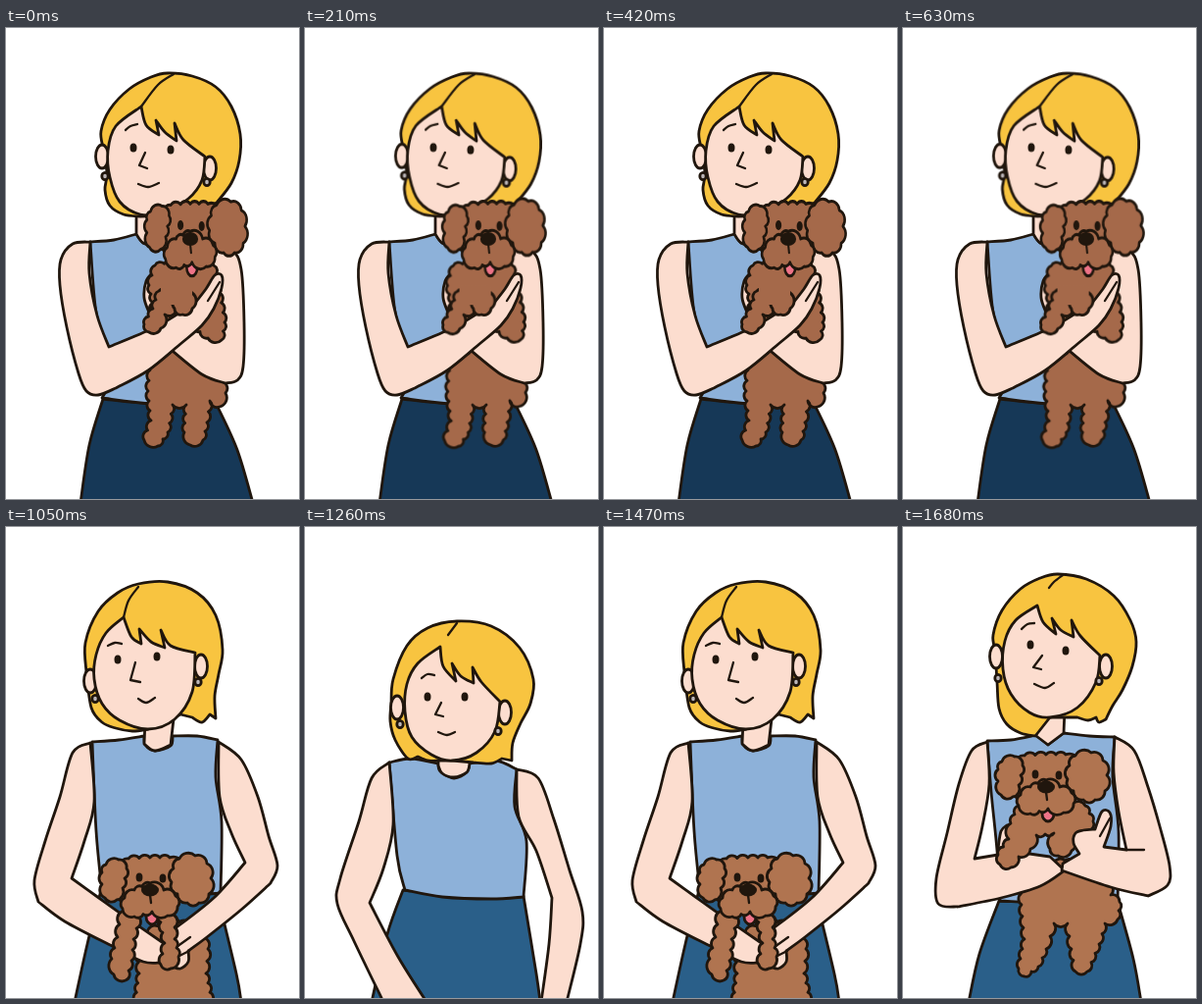
Write an HTML page that moves like this. It is 299 px wide and 480 px high and loops after 1890 ms.

```html
<!DOCTYPE html>
<html lang="en">
<head>
<meta charset="utf-8">
<title>Woman hugging a poodle</title>
<style>
  html, body { margin: 0; width: 100%; height: 100%; overflow: hidden; background: #fff; }
  svg { display: block; width: 100vw; height: 100vh; }
  path, ellipse { stroke: #20160d; stroke-width: 2.8; stroke-linejoin: round; stroke-linecap: round; }
  .ink { fill: #20160d; stroke: none; }
  .thin { stroke-width: 2.3; }

  .pose { visibility: hidden; animation: 1890ms step-end infinite; }
  #hug { animation-name: hug; }
  #hold { animation-name: hold; }
  #low { animation-name: low; }
  #alone { animation-name: alone; }
  @keyframes hug { 0% { visibility: visible } 44.444%, 100% { visibility: hidden } }
  @keyframes hold {
    0%, 55.555% { visibility: hidden }
    44.444%, 88.888%, 100% { visibility: visible }
  }
  @keyframes low {
    0%, 66.666%, 88.888%, 100% { visibility: hidden }
    55.555%, 77.777% { visibility: visible }
  }
  @keyframes alone { 0%, 77.777%, 100% { visibility: hidden } 66.666% { visibility: visible } }

  .sway { animation: sway 420ms step-end infinite; }
  .head { transform-origin: 150px 200px; --tilt: .7deg; }
  .pup { transform-origin: 185px 300px; --tilt: -.7deg; }
  @keyframes sway { 50% { transform: rotate(var(--tilt)) } }
</style>
</head>
<body>
<svg id="stage" viewBox="0 0 299 480" preserveAspectRatio="none"></svg>
<script>
const SKIN = '#fcddcf', HAIR = '#f8c440', TOP = '#8db1d9', SKIRT = '#2a5f89', NIGHT = '#163857';
const FUR = '#b07450', DARKFUR = '#a5694a', PINK = '#ee7388';

const points = text => (text.match(/-?[\d.]+ -?[\d.]+/g) || []).map(p => p.split(' ').map(Number));

// Smooth line through the points; "/" makes the point before it a corner.
function curve(text) {
  let last, d = '';
  for (const part of text.split('/')) {
    const run = points(part);
    if (!run.length) continue;
    if (last) run.unshift(last); else d = 'M' + run[0];
    for (let i = 0; i < run.length - 1; i++) {
      const b = run[i], c = run[i + 1], a = run[i - 1] || b, e = run[i + 2] || c;
      const mix = (p, q, r) => [p[0] + (q[0] - r[0]) / 6, p[1] + (q[1] - r[1]) / 6];
      d += 'C' + [mix(b, c, a), mix(c, b, e), c];
    }
    last = run[run.length - 1];
  }
  return d;
}

// Closed clockwise outline made of small round bumps.
function fur(text, fill) {
  const pts = points(text);
  let d = 'M' + pts[0];
  pts.forEach(([x, y], i) => {
    const [u, v] = pts[(i + 1) % pts.length];
    const len = Math.hypot(u - x, v - y), n = Math.max(1, Math.round(len / 11)), r = len / n * .62;
    for (let k = 1; k <= n; k++) d += `A${r} ${r} 0 0 1 ${x + (u - x) * k / n} ${y + (v - y) * k / n}`;
  });
  return `<path d="${d}Z" fill="${fill}"/>`;
}

const shape = (fill, text) => `<path d="${curve(text)}Z" fill="${fill}"/>`;
const line = text => `<path class="thin" d="${curve(text)}" fill="none"/>`;
const oval = (x, y, rx, ry, attrs) => `<ellipse cx="${x}" cy="${y}" rx="${rx}" ry="${ry}" ${attrs}/>`;
const dots = (text, rx, ry, attrs) => points(text).map(([x, y]) => oval(x, y, rx, ry, attrs)).join('');

const head = o =>
  shape(HAIR, o.hair) +
  dots(o.ears, 6.5, 12, `fill="${SKIN}"`) +
  shape(SKIN, o.face) +
  dots(o.rings, 3.2, 3.6, 'fill="#bcb6b8"') +
  dots(o.eyes, 3.5, 4.6, 'class="ink"') +
  [o.part, o.brow, o.nose, o.mouth].map(line).join('');

const dogHead = (x, y, fill, scale = '1 1') => `<g transform="translate(${x} ${y}) scale(${scale})">` +
  fur('-38 -18 -22 -32 0 -33 20 -33 34 -25 30 10 -28 12', fill) +
  fur('-45 -26 -32 -31 -24 -22 -28 -2 -34 10 -46 8 -49 -6 -49 -18', fill) +
  fur('24 -22 30 -32 46 -35 58 -27 62 -12 60 4 50 13 38 13 28 4 22 -8', fill) +
  oval(2, 27, 6, 8, `fill="${PINK}"`) +
  fur('-16 0 0 -7 14 0 26 6 28 17 18 26 2 22 -16 27 -28 19 -26 8', fill) +
  dots('-11 -13 13 -12', 3.4, 4.6, 'class="ink"') +
  oval(0, 0, 9, 6.5, 'class="ink"') + line('0 5 1 13') + '</g>';

const poses = {
  hug: [
    shape(NIGHT, '99 378 85 425 76 484 / 252 484 / 236 430 215 384 / 150 383 99 378'),
    shape(TOP, '86 218 110 216 133 210 / 140 219 152 222 / 205 225 / 214 384 / 150 383 98 377 / 104 365 106 340 / 92 290 86 218'),
    shape(SKIN, '133 183 / 133 210 / 140 219 154 222 / 175 222 / 175 183'),
    '<g class="sway head">',
    head({
      hair: '99 122 97 105 106 83 126 62 148 50 165 46 190 49 214 60 230 80 239 108 238 135 230 158 215 178 / 190 190 / 137 192 / 120 190 106 181 101 165 103 148 99 122',
      face: '138 80 / 143 99 156 109 / 153 94 / 162 106 174 115 / 172 97 / 181 114 203 131 / 200 155 186 174 160 188 137 190 116 177 106 152 104 125 112 100 138 80',
      ears: '98 131 208 143', rings: '101 151 205 157', eyes: '130 122 168 124',
      part: '171 47 155 58 138 80', brow: '122 104 127 100 134 98',
      nose: '142 127 / 136 140 / 144 143', mouth: '135 159 145 162 156 158'
    }),
    '</g><g class="sway pup">',
    fur('148 338 185 325 220 350 224 372 218 386 208 380 205 402 201 420 188 425 182 412 184 384 170 384 165 412 155 426 141 420 148 400 145 370', DARKFUR),
    '</g>',
    shape(SKIN, '205 222 / 230 226 240 246 243 300 242 345 236 359 224 362 / 200 353 165 325 / 190 300 / 205 270'),
    shape(SKIN, '150 249 143 258 141 275 146 290 / 160 285 / 160 252'),
    '<g class="sway pup">',
    fur('152 242 190 235 212 242 218 270 223 300 220 318 206 316 190 303 172 295 160 306 148 306 150 280 146 262', DARKFUR),
    '</g>',
    shape(SKIN, '86 218 68 220 56 236 55 262 62 305 74 352 82 370 94 374 112 367 / 145 349 178 322 200 303 212 286 220 265 220 252 213 252 204 266 190 284 / 176 291 / 150 306 105 325 / 93 293 85 250 86 218'),
    line('218 259 206 278'),
    '<g class="sway pup">',
    fur('156 268 172 270 174 288 162 292 158 306 146 310 141 302 150 286', DARKFUR),
    fur('176 270 190 270 190 286 180 292 172 286', DARKFUR),
    `<path d="M158 262H190V282H158Z" fill="${DARKFUR}" style="stroke:none"/>`,
    dogHead(188, 215, DARKFUR, '.9 1.08'),
    '</g>'
  ],

  hold: [
    shape(SKIRT, '98 381 78 435 67 484 / 243 484 / 235 440 219 382'),
    shape(TOP, '86 218 110 217 136 212 / 148 222 / 164 210 / 190 213 216 214 / 214 255 220 310 219 383 / 160 384 99 381 / 96 330 90 270 86 218'),
    shape(SKIN, '135 186 / 136 213 / 148 222 / 164 210 / 165 186'),
    head({
      hair: '94 125 92 110 101 85 120 63 140 52 158 48 187 53 215 70 232 95 238 117 234 142 224 166 214 182 207 196 / 200 199 197 194 / 189 197 178 194 / 150 194 / 135 213 / 120 210 106 201 98 185 96 158 94 125',
      face: '137 80 / 143 97 156 109 / 152 93 / 161 105 174 112 / 172 95 / 181 111 201 131 / 197 158 178 184 150 194 129 189 110 170 102 145 104 116 115 95 137 80',
      ears: '95 132 207 142', rings: '97 154 200 157', eyes: '130 120 166 126',
      part: '163 49 154 56 149 62', brow: '121 104 127 99 134 98',
      nose: '142 131 / 133 143 / 141 145', mouth: '134 160 145 164 154 159'
    }),
    fur('120 350 165 340 210 352 212 375 221 382 219 400 206 404 200 425 188 453 176 453 172 430 168 404 154 404 146 430 138 448 124 458 118 450 124 420 121 385', FUR),
    shape(SKIN, '86 219 70 228 57 262 45 312 34 358 36 384 56 387 / 100 378 140 366 165 350 / 150 336 / 115 331 / 73 338 / 81 305 88 262 86 219'),
    shape(SKIN, '97 328 100 310 106 304 / 116 305 / 116 330'),
    fur('118 284 160 280 186 284 194 300 186 318 174 318 172 330 158 335 150 328 154 312 136 314 130 328 118 336 110 347 99 344 97 334 108 318 110 302', FUR),
    shape(SKIN, '216 214 236 228 250 265 262 305 272 345 270 365 250 376 / 212 367 162 350 / 163 343 / 180 333 / 174 322 176 312 184 309 196 308 / 203 290 211 291 212 305 205 326 / 228 329 / 220 290 215 250 216 214'),
    line('228 329 246 329'), line('211 297 201 315'),
    dogHead(146, 265, FUR)
  ],

  low: [
    shape(SKIRT, '97 370 83 425 70 484 / 240 484 / 235 455 215 372'),
    shape(TOP, '88 219 115 217 141 213 / 142 222 152 228 168 223 170 213 / 195 213 216 217 / 214 255 220 300 219 373 / 150 378 98 372 / 92 310 88 219'),
    shape(SKIN, '142 198 / 141 221 / 152 228 168 222 / 171 196'),
    head({
      hair: '82 148 81 118 94 86 114 67 135 58 165 56 195 67 214 90 221 125 217 150 213 172 214 195 / 208 191 / 200 199 190 194 / 178 191 / 145 206 / 129 208 112 205 98 199 87 184 82 148',
      face: '120 92 / 128 112 138 119 / 136 104 / 148 117 162 123 / 158 105 / 168 121 193 128 / 190 168 172 196 145 206 116 197 98 180 90 155 92 130 102 108 120 92',
      ears: '86 157 199 142', rings: '91 175 196 158', eyes: '114 135 154 132',
      part: '135 61 125 75 120 92', brow: '104 121 111 118 118 119',
      nose: '132 138 / 127 156 / 137 158', mouth: '135 175 143 179 152 174'
    }),
    fur('134 420 165 400 200 408 206 430 204 455 210 484 132 484 136 455', FUR),
    shape(SKIN, '217 219 240 237 257 275 268 315 277 345 270 363 / 240 390 205 418 186 432 / 186 443 178 450 170 448 / 160 430 170 411 / 212 378 244 342 / 230 312 218 275 217 219'),
    line('174 428 188 418'), line('175 438 187 432'),
    shape(SKIN, '86 220 68 230 55 275 40 320 29 360 33 382 / 60 402 110 428 140 443 158 444 / 162 425 / 120 396 92 376 67 358 / 80 320 90 280 86 220'),
    fur('118 392 136 398 130 420 128 442 122 462 110 456 108 440 114 418', FUR),
    fur('156 392 172 396 172 420 176 438 168 450 158 446 162 424', FUR),
    dogHead(147, 370, FUR)
  ],

  alone: [
    shape(SKIRT, '100 370 84 415 68 484 / 240 484 / 236 455 223 376'),
    shape(TOP, '86 240 108 236 136 241 / 138 249 152 256 165 250 168 241 / 195 238 216 247 / 214 285 226 320 223 377 / 190 379 140 377 102 370 / 94 335 86 240'),
    shape(SKIN, '136 230 / 136 243 / 140 251 152 255 165 250 168 241 / 170 228'),
    head({
      hair: '88 180 90 155 104 121 125 103 155 96 190 101 219 123 233 155 230 180 220 200 212 220 211 238 / 201 236 / 190 241 172 240 / 150 238 / 136 238 / 125 238 115 234 / 105 236 92 217 87 198 88 180',
      face: '138 122 / 141 142 154 157 / 150 139 / 159 152 172 159 / 171 143 / 180 158 199 178 / 194 208 175 230 150 238 129 232 109 214 102 188 104 160 115 139 138 122',
      ears: '94 184 204 189', rings: '97 201 197 208', eyes: '125 173 163 173',
      part: '155 98 146 110', brow: '119 154 125 150 132 151',
      nose: '139 179 / 133 191 / 141 193', mouth: '136 209 145 212 153 209'
    }),
    shape(SKIN, '86 240 68 256 55 300 36 358 33 384 50 422 80 484 / 124 484 / 95 438 66 383 / 80 348 90 303 86 240'),
    shape(SKIN, '216 247 238 256 254 298 270 350 283 392 281 425 267 484 / 241 484 / 249 425 252 378 / 236 330 218 295 216 247')
  ]
};

document.getElementById('stage').innerHTML = Object.entries(poses)
  .map(([id, parts]) => `<g id="${id}" class="pose">${parts.join('')}</g>`).join('');
</script>
</body>
</html>
```
